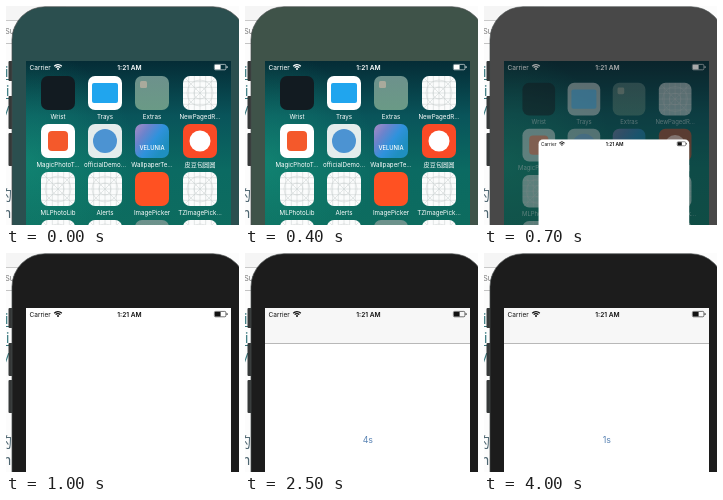
Animation of 233x219 px, one loop 4300 ms. Source, as an HTML page with a canvas:

```html
<!DOCTYPE html>
<html lang="en">
<head>
<meta charset="utf-8">
<title>App launch and countdown</title>
<style>
html, body { margin: 0; width: 100%; height: 100%; overflow: hidden; background: #fff; }
canvas { display: block; width: 100vw; height: 100vh; }
</style>
</head>
<body>
<canvas id="stage" width="233" height="219"></canvas>
<script>
const ctx = document.getElementById('stage').getContext('2d');
const LOOP = 4300, STEP = 100;
const SCREEN = { x: 20, y: 55, w: 205, h: 365 };
const ICON = 34, COLUMNS = [35, 82, 129, 177], ROWS = [70, 118, 166, 214];
const SANS = 'Inter, "Noto Sans CJK SC", "Noto Sans CJK", sans-serif';

const mix = (a, b, p) => a + (b - a) * p;
const clamp = v => Math.max(0, Math.min(1, v));

// Linear interpolation through [time, value] pairs
function track(keys, t) {
  if (t <= keys[0][0]) return keys[0][1];
  for (let i = 1; i < keys.length; i++) {
    const [t0, v0] = keys[i - 1], [t1, v1] = keys[i];
    if (t <= t1) return mix(v0, v1, (t - t0) / (t1 - t0));
  }
  return keys[keys.length - 1][1];
}

function rounded(x, y, w, h, r, fill) {
  ctx.beginPath();
  ctx.roundRect(x, y, w, h, r);
  if (fill) { ctx.fillStyle = fill; ctx.fill(); }
}

function rect(x, y, w, h, fill) {
  ctx.fillStyle = fill;
  ctx.fillRect(x, y, w, h);
}

function disc(x, y, r, fill) {
  ctx.beginPath();
  ctx.arc(x, y, r, 0, Math.PI * 2);
  ctx.fillStyle = fill;
  ctx.fill();
}

function text(str, x, y, size, fill, align = 'center', weight = 400) {
  ctx.font = `${weight} ${size}px ${SANS}`;
  ctx.textAlign = align;
  ctx.fillStyle = fill;
  ctx.fillText(str, x, y);
}

function gradient(x0, y0, x1, y1, colors) {
  const g = ctx.createLinearGradient(x0, y0, x1, y1);
  colors.forEach((c, i) => g.addColorStop(i / (colors.length - 1), c));
  return g;
}

function withState(draw) {
  ctx.save();
  draw();
  ctx.restore();
}

function drawDesktop() {
  rect(0, 0, 233, 219, '#fcfcfc');
  rect(0, 0, 60, 14, '#f5f5f5');
  rect(0, 14, 40, 1, '#c9c9c9');
  rect(0, 37, 20, 1, '#c4c4c4');
  text('Su', -1, 28, 7.5, '#777', 'left');
  const teal = '#35777d';
  text('il', -1, 71, 14, teal, 'left');
  text('i', 0, 90, 14, teal, 'left');
  text('y', -4, 108, 14, teal, 'left');
  rect(0, 73, 5, 1, teal);
  rect(0, 92, 5, 1, teal);
  text('的', -8, 194, 14, '#4d6570', 'left');
  text('m', -7, 212, 14, '#4d6570', 'left');
}

function drawPhone(bezel) {
  for (const [y, h] of [[55, 20], [90, 33], [127, 33]]) rounded(2.5, y, 5, h, 1, '#353838');
  rounded(6, .8, 234, 440, 33, bezel);
  ctx.strokeStyle = 'rgba(70,74,74,.7)';
  ctx.lineWidth = 1;
  ctx.stroke();
}

function drawStatus(color) {
  text('Carrier', 23.5, 63.5, 6.5, color, 'left');
  text('1:21 AM', 123.5, 63.5, 6.6, color, 'center', 600);
  ctx.strokeStyle = color;
  ctx.lineWidth = 1.2;
  for (const r of [3.2, 5.2]) {
    ctx.beginPath();
    ctx.arc(52, 63.8, r, -Math.PI * .76, -Math.PI * .24);
    ctx.stroke();
  }
  disc(52, 62.9, 1, color);
  ctx.lineWidth = .6;
  rounded(208.4, 58.4, 11.5, 5.4, 1.2);
  ctx.stroke();
  rect(209, 59, 5.6, 4.4, color);
  rect(220.6, 60.2, .9, 1.8, color);
}

function drawWallpaper() {
  const { x, y, w, h } = SCREEN;
  rect(x, y, w, h, gradient(0, 55, 0, 219, ['#052c36', '#09545a', '#0b6a62', '#0d6c5f']));
  const glow = ctx.createRadialGradient(20, 155, 0, 20, 155, 110);
  glow.addColorStop(0, 'rgba(22,150,125,.55)');
  glow.addColorStop(1, 'rgba(22,150,125,0)');
  rect(x, y, w, h, glow);
}

function placeholder(x, y) {
  const c = ICON / 2;
  rounded(x, y, ICON, ICON, 7, '#fbfcfc');
  ctx.clip();
  ctx.translate(x, y);
  ctx.strokeStyle = '#c3c9c9';
  ctx.lineWidth = .45;
  ctx.beginPath();
  for (let i = 1; i < 6; i++) {
    const p = i * ICON / 6;
    ctx.moveTo(p, 0); ctx.lineTo(p, ICON);
    ctx.moveTo(0, p); ctx.lineTo(ICON, p);
  }
  ctx.moveTo(0, 0); ctx.lineTo(ICON, ICON);
  ctx.moveTo(ICON, 0); ctx.lineTo(0, ICON);
  for (const r of [6, 13]) {
    ctx.moveTo(c + r, c);
    ctx.arc(c, c, r, 0, Math.PI * 2);
  }
  ctx.stroke();
}

const tile = (x, y, fill) => rounded(x, y, ICON, ICON, 7, fill);

function folder(x, y) {
  tile(x, y, gradient(x, y, x, y + ICON, ['#6d918c', '#6a9a86']));
  rounded(x + 5, y + 5, 7, 7, 1.5, '#a9aa9c');
}

function blueTile(x, y) {
  tile(x, y, '#fff');
  rounded(x + 4, y + 7, 26, 20, 2, '#20a5ee');
}

function orangeTile(x, y) {
  tile(x, y, '#fff');
  rounded(x + 7, y + 7, 20, 20, 4, '#f4592b');
}

function discTile(x, y) {
  tile(x, y, '#e4ecec');
  disc(x + 17, y + 17, 12, '#4c93d2');
}

function galleryTile(x, y) {
  tile(x, y, gradient(x, y, x + 30, y + 22, ['#a98bc4', '#6d83cc', '#2f92dc', '#1f8fc0']));
  text('VELUNIA', x + 17, y + 26, 5.8, '#fff', 'center', 500);
}

function redTile(x, y) {
  tile(x, y, '#fa4a26');
  disc(x + 17, y + 17, 10.5, '#fff');
}

const APPS = [
  [['Wrist', (x, y) => tile(x, y, '#121b21')], ['Trays', blueTile], ['Extras', folder], ['NewPagedR…', placeholder]],
  [['MagicPhotoT…', orangeTile], ['officialDemo…', discTile], ['WallpaperTe…', galleryTile], ['皮豆包圆圆', redTile]],
  [['MLPhotoLib', placeholder], ['Alerts', placeholder], ['ImagePicker', (x, y) => tile(x, y, '#ff5122')],
   ['TZImagePick…', placeholder]],
  [['', placeholder], ['', placeholder], ['', folder], ['', placeholder]]
];

function drawHome(launch) {
  drawWallpaper();
  withState(() => {
    const scale = 1 - .06 * launch;
    ctx.translate(122, 240);
    ctx.scale(scale, scale);
    ctx.translate(-122, -240);
    ctx.globalAlpha = 1 - .75 * launch;
    APPS.forEach((row, r) => row.forEach(([name, draw], c) => {
      withState(() => draw(COLUMNS[c], ROWS[r]));
      text(name, COLUMNS[c] + ICON / 2, ROWS[r] + 42.5, 6.2, '#fff');
    }));
  });
  drawStatus('#fff');
  rect(SCREEN.x, SCREEN.y, SCREEN.w, SCREEN.h, `rgba(20,24,26,${.55 * launch})`);
}

const countdown = [[1900, 2100, '5s'], [2400, 2500, '4s'], [2900, 3100, '3s'], [3300, 3500, '2s'], [3900, 4000, '1s']];

// Fade progress reaches 1 on the closing step
const fade = (t, start, end) => clamp((t - start + STEP) / (end - start + STEP));

function drawApp(t) {
  const { x, y, w, h } = SCREEN;
  rect(x, y, w, h, '#fff');
  withState(() => {
    ctx.globalAlpha = fade(t, 1900, 2100);
    rect(x, y, w, 35, '#f7f7f7');
    rect(x, 90, w, 1, '#b8b8b8');
  });
  countdown.forEach(([start, end, label], i) => {
    const next = countdown[i + 1];
    const alpha = fade(t, start, end) - (next ? fade(t, next[0], next[1]) : 0);
    if (alpha <= 0) return;
    withState(() => {
      ctx.globalAlpha = alpha;
      text(label, 122.8, 190, 8.8, '#5680b2');
    });
  });
  drawStatus('#111');
}

function drawLaunch(t) {
  const across = track([[500, 0], [600, .25], [700, .685], [800, .92], [900, .985], [1000, 1]], t);
  const down = track([[500, 0], [600, .05], [700, .295], [800, .8], [900, .97], [1000, 1]], t);
  const x = mix(COLUMNS[2], SCREEN.x, across), y = mix(ROWS[2], SCREEN.y, down);
  const w = mix(ICON, SCREEN.w, across), h = mix(ICON, SCREEN.h, down);
  rounded(x, y, w, h, 7 * (1 - down));
  ctx.clip();
  ctx.translate(x, y);
  ctx.scale(w / SCREEN.w, w / SCREEN.w);
  ctx.translate(-SCREEN.x, -SCREEN.y);
  drawApp(t);
  ctx.globalAlpha = clamp((700 - t) / 200);
  rect(SCREEN.x, SCREEN.y, SCREEN.w, SCREEN.h, '#ff5122');
}

function bezelColor(t) {
  if (t < 100) return '#2b4f4f';
  if (t < 700) return '#3f5349';
  const v = Math.round(track([[700, 72], [800, 54], [900, 38], [1000, 28]], t));
  return `rgb(${v},${v},${v})`;
}

function render(time) {
  const t = Math.floor(time % LOOP / STEP) * STEP;
  drawDesktop();
  drawPhone(bezelColor(t));
  withState(() => {
    ctx.beginPath();
    ctx.rect(SCREEN.x, SCREEN.y, SCREEN.w, SCREEN.h);
    ctx.clip();
    if (t < 1000) drawHome(track([[500, 0], [600, .25], [700, .66], [800, 1]], t));
    if (t > 500) withState(() => drawLaunch(t));
  });
}

const begin = performance.now();
function tick() {
  render(performance.now() - begin);
  requestAnimationFrame(tick);
}
tick();
</script>
</body>
</html>
```
